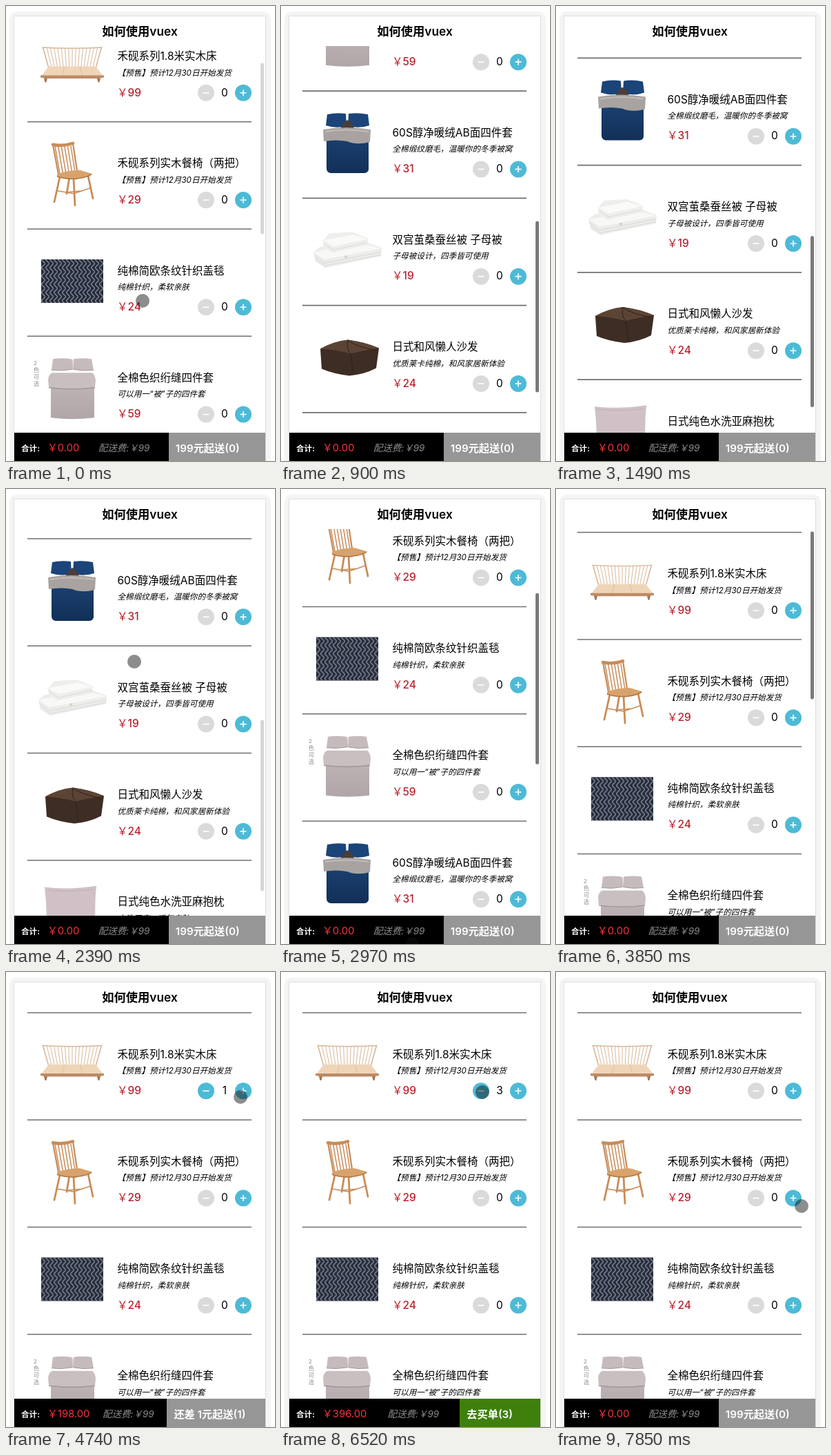
Recreate the animation shown at these times as an HTML page. Size 390 by 659 pixels, loop 8000 ms.

```html
<!DOCTYPE html>
<html lang="zh-CN">
<head>
<meta charset="utf-8">
<style>
html, body { margin: 0; width: 100%; height: 100%; overflow: hidden; background: #fff; }
body { position: relative; font-family: Inter, "Noto Sans CJK SC", "Noto Sans CJK", sans-serif; }
svg { display: block; }
.name { font-size: 15.5px; }
.note { font-size: 11.6px; font-style: italic; }
.price { font-size: 15.5px; font-weight: 500; fill: #b9222f; }
.count { font-size: 15.5px; text-anchor: middle; }
.sign { stroke: #fff; stroke-width: 1.6; fill: none; }
.wood { stroke: #c98c57; fill: none; stroke-linecap: round; }
.pale { stroke: #d9b799; }
.tag { font-size: 8px; fill: #8a8a8a; }
footer {
  position: absolute; left: 12px; top: 618px; width: 364px; height: 41px; overflow: hidden;
  display: flex; background: #000; white-space: nowrap; line-height: 45px;
}
footer > * { flex: 1 1 auto; }
.sum { padding-left: 10px; font-size: 11.6px; font-weight: 700; color: #fff; }
#total { margin-left: 11px; font-size: 14.8px; font-weight: 400; color: #f5333a; }
.fee { font-size: 13.5px; line-height: 44px; font-style: italic; color: #8c8c8c; }
#pay { padding: 0 10px; font-size: 15.2px; font-weight: 600; color: #fff; }
#touch {
  position: absolute; left: -10px; top: -10px; width: 20px; height: 20px;
  border-radius: 50%; background: #111; opacity: .48;
}
</style>
</head>
<body>
<svg width="390" height="659" viewBox="0 0 390 659">
  <defs>
    <clipPath id="view"><rect x="12" y="58" width="364" height="560"/></clipPath>
    <pattern id="zigzag" x="51" y="44" width="6" height="12" patternUnits="userSpaceOnUse">
      <path d="M0 0L6 6L0 12" fill="none" stroke="#7f8796" stroke-width="1.5"/>
    </pattern>
    <linearGradient id="linen" x2="0" y2="1">
      <stop stop-color="#c0b6b7"/><stop offset="1" stop-color="#b0a6a8"/>
    </linearGradient>
    <linearGradient id="navy" x2="0" y2="1">
      <stop stop-color="#1c4273"/><stop offset="1" stop-color="#123058"/>
    </linearGradient>
  </defs>
  <path d="M5 659V20Q5 8 17 8H372Q384 8 384 20V659Z" fill="#f4f4f4"/>
  <path d="M11.5 660V14.5H376.5V660" fill="#fff" stroke="#dedede"/>
  <text x="194" y="43" font-size="17.3" font-weight="600" text-anchor="middle">如何使用vuex</text>
  <g clip-path="url(#view)"><g id="list"></g></g>
  <rect id="thumb" x="369" width="5" rx="2.5"/>
</svg>
<footer>
  <div class="sum">合计:<span id="total"></span></div>
  <div class="fee">配送费:￥99</div>
  <div id="pay"></div>
</footer>
<div id="touch"></div>
<script>
const LOOP = 8000, TICK = 148, ROW = 155.25, TOP = 59, FEE = 99, MINIMUM = 199;
const $ = id => document.getElementById(id);
const set = (el, attrs) => { for (const k in attrs) el.setAttribute(k, attrs[k]); };
const repeat = (n, fn) => Array.from({ length: n }, (_, i) => fn(i)).join('');
const shape = (d, fill, extra = '') => `<path d="${d}" fill="${fill}" ${extra}/>`;
const line = (d, color, width = 1) => shape(d, 'none', `stroke="${color}" stroke-width="${width}"`);
const wood = (d, width, kind = '') => `<path class="wood ${kind}" stroke-width="${width}" d="${d}"/>`;

// Product pictures, drawn relative to the row's upper rule
const bed = () =>
  repeat(17, i => wood(`M${54 + i * 5.25} ${48 + Math.sin(i / 16 * Math.PI)}L${62 + i * 4.25} 77`, 1, 'pale')) +
  wood('M53 47.5Q96 50 139 47.5M53.5 48L62 78M138.5 48L130 78', 1.3, 'pale') +
  shape('M62 75H130L141 89H51Z', '#efd5b8') +
  line('M85 75L81 89M107 75L111 89', '#e0bf9c') +
  shape('M50 88H142V91L134 92.5H58L50 91Z', '#bd8b66') +
  shape('M55 92H60L58.5 98H56.5ZM132 92H137L135.5 98H133.5Z', '#a9764f');

const chair = () =>
  repeat(6, i => wood(`M${71 + i * 4.6} 35L${78 + i * 4.4} ${75 - i * .5}`, 1.5)) +
  wood('M68 33Q83 36 97 31', 4.5) +
  wood('M68 33L76 76M97 31L103 71', 2.2) +
  wood('M78 80L70 116M98 82L100 121M119 78L126 111M92 80L88 104', 2.8) +
  wood('M75 100L98 104L122 96M88 102L111 100', 1.5) +
  shape('M74 76Q88 70 107 70L124 75Q121 79 101 82Q84 82 74 79Z', '#d8a26c') +
  line('M74 79Q84 83 101 82.5Q120 80 124 75.5', '#b4783f', 1.8);

const rug = () => ['#272b39', 'url(#zigzag)'].map(fill => shape('M51 44H141V107H51Z', fill)).join('');

const linen = () =>
  repeat(4, i => `<text class="tag" x="40" y="${42 + i * 10}">${'2色可选'[i]}</text>`) +
  shape('M68 33Q80 31 95 33L96 48Q80 51 66 49ZM98 33Q112 31 124 33L127 49Q112 51 97 48Z', '#c6bbbc') +
  line('M66 49Q80 51 96 48V34M97 48Q112 51 127 49', '#a39899') +
  shape('M65 60H128V118Q96 122 65 118Z', 'url(#linen)') +
  shape('M61 63Q62 55 67 53H125Q129 56 130 64L129 74Q96 78 62 74Z', '#c9bfc0') +
  line('M62 74.5Q96 78.5 129 74.5', '#a1979a', 1.3);

const duvet = () =>
  shape('M67 34Q80 31 94 33L95 51Q80 55 65 50ZM98 33Q112 31 126 34L128 50Q114 55 97 51Z', '#1b4479') +
  shape('M92 46L96 42L102 46L106 54H86Z', '#4c3d36') +
  shape('M66 58H127V114Q126 119 120 119H72Q66 118 66 112Z', 'url(#navy)') +
  shape('M61 56Q94 50 130 56L129 74Q110 79 96 73Q80 70 62 73Z', '#a8a3a0') +
  line('M64 59Q94 54 127 59', '#c1bcb8', 2);

const silk = () =>
  shape('M47 78L56 71L121 63L146 72L145 84L64 101L50 92Z', '#ececea') +
  shape('M47 78L118 66L146 73L63 89Z', '#f8f8f6') +
  shape('M61 61L70 51L103 49L126 58L125 68L75 79L62 72Z', '#eeeeec') +
  shape('M61 61L104 53L126 59L76 70Z', '#fafaf8') +
  line('M48 83L63 94L145 78M50 88L64 98L145 82M62 66L76 75L125 64', '#d5d5d2', .8) +
  '<circle cx="94" cy="85" r="2" fill="#d9cfbc"/>';

const sofa = () =>
  shape('M57 63Q76 53 97 50Q121 53 142 62L138 91Q121 100 99 102Q75 99 59 92Z', '#3e2d24') +
  shape('M57 63Q76 52 97 50Q121 53 142 62Q116 66 101 70Q78 64 57 63Z', '#5c4435') +
  line('M97 51Q94 63 101 70L105 100M97 51Q110 60 137 65', '#2e2019');

const pillow = () =>
  shape('M56 39Q94 43 131 37Q127 75 132 117Q94 112 57 118Q61 78 56 39Z', '#cfc1c6') +
  line('M60 43Q94 47 127 42', '#bfb0b6');

const goods = [
  [bed, '禾砚系列1.8米实木床', '【预售】预计12月30日开始发货', 99],
  [chair, '禾砚系列实木餐椅（两把）', '【预售】预计12月30日开始发货', 29],
  [rug, '纯棉简欧条纹针织盖毯', '纯棉针织，柔软亲肤', 24],
  [linen, '全棉色织绗缝四件套', '可以用一“被”子的四件套', 59],
  [duvet, '60S醇净暖绒AB面四件套', '全棉缎纹磨毛，温暖你的冬季被窝', 31],
  [silk, '双宫茧桑蚕丝被 子母被', '子母被设计，四季皆可使用', 19],
  [sofa, '日式和风懒人沙发', '优质莱卡纯棉，和风家居新体验', 24],
  [pillow, '日式纯色水洗亚麻抱枕', '水洗亚麻，透气亲肤', 29]
];

$('list').innerHTML = goods.map(([draw, name, note, price], i) => `
  <g transform="translate(0 ${i * ROW})">
    ${line('M31 0H356', '#707070', 1.6)}
    ${draw()}
    <text class="name" x="161.5" y="65.5">${name}</text>
    <text class="note" x="161.5" y="88">${note}</text>
    <text class="price" x="161" y="118">￥${price}</text>
    <circle class="less" cx="290" cy="113.3" r="12" fill="#dadada"/>
    <path class="sign" d="M285.5 113.3h9"/>
    <text class="count" x="317" y="118">0</text>
    <circle cx="344" cy="113.3" r="12" fill="#4dbad6"/>
    <path class="sign" d="M339.5 113.3h9m-4.5 -4.5v9"/>
  </g>`).join('');
const less = document.querySelector('.less'), count = document.querySelector('.count');

// All times below are in screen refreshes of TICK ms
const ease = u => u * u * (3 - 2 * u);
const clamp = u => Math.min(1, Math.max(0, u));

// Pointer moves: from, to, x, y
const moves = [
  [0, 2, 197, 380], [3, 4, 195, 63], [4, 5, 230, -40],        // flick up
  [15, 16, 186, 250], [16, 20, 190, 659], [20, 21, 300, 700], // pull down
  [27, 31, 340, 181], [37, 41, 342, 333],                     // to plus, then away
  [41, 44, 292, 174], [50, 53, 356, 339]                      // to minus, then away
];
const plus = [32, 35, 36], minus = [46, 47, 49];

function pointer(k) {
  let x = 198, y = 427;
  for (const [from, to, toX, toY] of moves) {
    const u = ease(clamp((k - from) / (to - from)));
    x += (toX - x) * u;
    y += (toY - y) * u;
  }
  return [x, y];
}

// The list follows the finger, glides on after release and springs back at the top
function scrolled(k, y) {
  const over = -60.5;
  if (k <= 4) return 46.5 + 427 - y;
  if (k <= 16) return 608 - 198 * .508 ** (k - 4);
  if (k <= 20) return 608 + 250 - y;
  if (k <= 23) return over + (199 - over) * ((23 - k) / 3) ** 2;
  return over * clamp((27 - k) / 4) ** 2;
}

// The scrollbar shows from a touch until the list rests, then fades
const shown = (k, from, to) => k < from ? 0 : clamp(Math.min(.31 + .7 * (k - from), (to + 3 - k) / 3));

function render(now) {
  const k = Math.floor(now % LOOP / TICK);
  const [x, y] = pointer(k), s = scrolled(k, y);
  $('touch').style.transform = `translate(${x}px, ${y}px)`;
  set($('list'), { transform: `translate(0 ${TOP - s})` });
  set($('thumb'), {
    y: 61.5 + .449 * Math.max(0, s),
    height: 248 + 1.35 * Math.min(0, s),
    opacity: .52 * Math.max(shown(k, 0, 11), shown(k, 16, 27))
  });

  const past = list => list.filter(tap => tap <= k).length;
  const n = past(plus) - past(minus), sum = n && n * goods[0][3] + FEE;
  count.textContent = n;
  set(less, { fill: n ? '#4dbad6' : '#dadada' });
  $('total').textContent = '￥' + sum.toFixed(2);
  $('pay').textContent = !n ? `${MINIMUM}元起送(0)`
    : sum < MINIMUM ? `还差 ${MINIMUM - sum}元起送(${n})` : `去买单(${n})`;
  $('pay').style.background = sum < MINIMUM ? '#969696' : '#3f800c';
}

const start = performance.now();
function loop() {
  render(performance.now() - start);
  requestAnimationFrame(loop);
}
loop();
</script>
</body>
</html>
```
